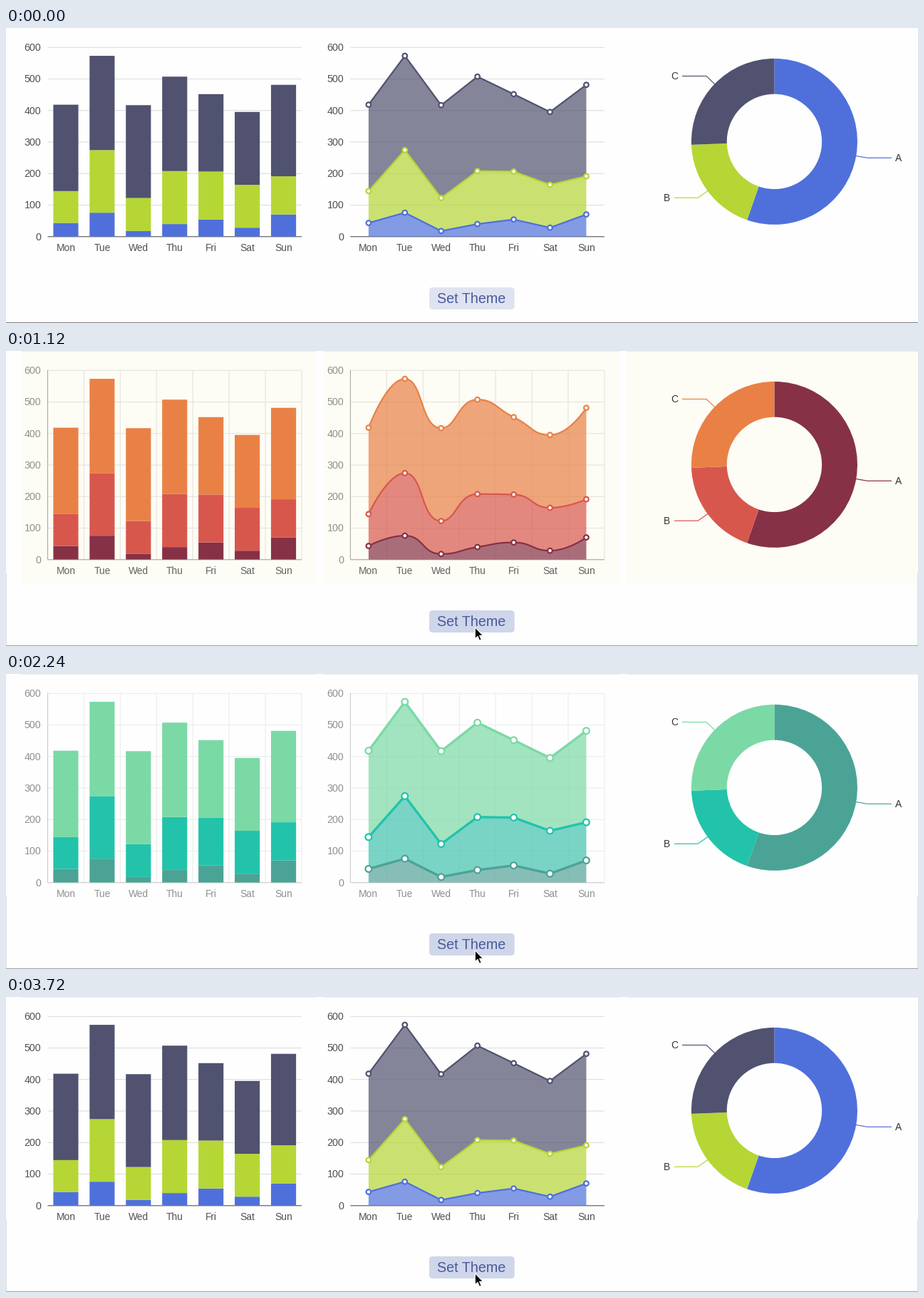
Write a matplotlib script that moves like this. It is 1280x414 px and loops after 3.88 s.

```python
import numpy as np
import matplotlib.pyplot as plt
from matplotlib.animation import FuncAnimation
from matplotlib.patches import Circle, FancyBboxPatch, Polygon, Rectangle, Wedge

W, H, DPI = 1280, 414, 64
PT = 72 / DPI
STEP, FRAMES = 40, 97
PAGE = "#fefefe"
FONT = "Liberation Sans"

DAYS = ["Mon", "Tue", "Wed", "Thu", "Fri", "Sat", "Sun"]
TOTALS = [
    [43, 75.5, 17.5, 39.5, 54, 28, 70],
    [144, 274, 122, 207.5, 206, 164, 191],
    [418, 573, 416.5, 507, 451.5, 395, 481],
]
BASE_Y, UNIT = 292.6, 0.4425
BAR_LEFT, LINE_LEFT, PLOT_W = 58.5, 483.4, 356.5
BAND = PLOT_W / 7
BAR_W = BAND * 0.69
PIE_CENTER, PIE_R, PIE_HOLE = (1078.4, 159.4), 116.5, 66.7
PIE_STOPS = [0, 199.2, 267.8, 360]
PIE_LABELS = [
    ("A", 1248, 182, "left", [(1193, 179.5), (1209, 182.3), (1243, 182.3)]),
    ("B", 932, 238, "right", [(985, 228.5), (971, 238.3), (938, 238.3)]),
    ("C", 943.5, 67.3, "right", [(995, 79), (983, 67.5), (949, 67.5)]),
]
PANELS = [(22, 435), (446, 861), (871, 1280)]

THEMES = [
    dict(colors=["#4f70db", "#b5d635", "#50526f"], panel=None, grid="#dedede",
         axis="#5f6066", y_text="#505050", x_text="#505050",
         columns=False, smooth=False, line=2.2, dot=3.3),
    dict(colors=["#863146", "#d8574d", "#e98146"], panel="#fdfcf5", grid="#e4e4de",
         axis="#a8a8a6", y_text="#909090", x_text="#626262",
         columns=True, smooth=True, line=2.2, dot=3.3),
    dict(colors=["#4ba396", "#22c3aa", "#7bd9a5"], panel=None, grid="#ececec",
         axis="#cacaca", y_text="#909090", x_text="#909090",
         areas=["#54a399", "#41c3af", "#7bd9a5"],
         columns=True, smooth=False, line=3.3, dot=4.4),
]

SWITCHES = [1120, 2000, 2960]
PRESS_MS = 160
ENTER, ARRIVE = 560, 880
CURSOR_FROM, CURSOR_TO = np.array([668, 418]), np.array([658.3, 387.8])
CURSOR = np.array([(0, 0), (0, 16), (3.7, 12.6), (6.3, 18.6), (8.9, 17.4),
                   (6.3, 11.6), (11.2, 11.4)])
NORMAL, HOVER, ACTIVE = "#dfe3f1", "#cfd6ea", "#bfc6e3"

plt.rcParams["path.snap"] = False
fig = plt.figure(figsize=(W / DPI, H / DPI), dpi=DPI, facecolor=PAGE)
ax = fig.add_axes([0, 0, 1, 1])
ax.set_xlim(0, W)
ax.set_ylim(H, 0)
ax.axis("off")


def value_y(value):
    return BASE_Y - np.asarray(value) * UNIT


def stroke(points, color, width=1.1, z=1):
    xs, ys = zip(*points)
    return ax.plot(xs, ys, color=color, lw=width * PT, zorder=z,
                   solid_capstyle="butt", solid_joinstyle="round")[0]


def fill(patch, color, z, alpha=1):
    patch.set(facecolor=color, edgecolor="none", linewidth=0, zorder=z, alpha=alpha)
    return ax.add_patch(patch)


def label(x, y, text, size, color, ha):
    return ax.text(x, y, text, fontsize=size * PT, color=color, ha=ha,
                   va="baseline", family=FONT, zorder=6)


def smooth_curve(points):
    """Bezier spline whose handles never overshoot the neighbouring points."""
    p = np.asarray(points, float)
    before, after = p.copy(), p.copy()
    for i in range(1, len(p) - 1):
        prev, here, following = p[i - 1:i + 2]
        a, b = np.linalg.norm(here - prev), np.linalg.norm(following - here)
        handle = here + (following - prev) * 0.5 * b / (a + b)
        handle = np.clip(handle, np.minimum(here, following), np.maximum(here, following))
        back = here - (handle - here) * a / b
        before[i] = np.clip(back, np.minimum(prev, here), np.maximum(prev, here))
        after[i] = here + (here - before[i]) * b / a
    t = np.linspace(0, 1, 24)[:, None]
    parts = [(1 - t) ** 3 * p[i] + 3 * (1 - t) ** 2 * t * after[i]
             + 3 * (1 - t) * t ** 2 * before[i + 1] + t ** 3 * p[i + 1]
             for i in range(len(p) - 1)]
    return np.vstack(parts)


def draw_axes(theme, left):
    right = left + PLOT_W
    parts = []
    for value in range(0, 601, 100):
        y = value_y(value)
        if value:
            parts.append(stroke([(left, y + 0.2), (right, y + 0.2)], theme["grid"]))
        parts.append(label(left - 9, y + 5, str(value), 14.3, theme["y_text"], "right"))
    if theme["columns"]:
        for i in range(1, 8):
            x = left + BAND * i
            parts.append(stroke([(x, 27), (x, BASE_Y)], theme["grid"]))
        parts.append(stroke([(left, 26.5), (left, BASE_Y)], theme["axis"], 1.1, 1.2))
    parts.append(stroke([(left, BASE_Y + 0.2), (right, BASE_Y + 0.2)], theme["axis"], 1.2, 1.2))
    for i, day in enumerate(DAYS):
        parts.append(label(left + BAND * (i + 0.5), 313, day, 13.7, theme["x_text"], "center"))
    return parts


def draw_bars(theme):
    parts = []
    lower = np.zeros(7)
    for totals, color in zip(TOTALS, theme["colors"]):
        for i in range(7):
            y0, y1 = value_y(lower[i]), value_y(totals[i])
            x = BAR_LEFT + BAND * (i + 0.5) - BAR_W / 2
            parts.append(fill(Rectangle((x, y1), BAR_W, y0 - y1), color, 1.5))
        lower = totals
    return parts


def draw_lines(theme):
    parts = []
    xs = LINE_LEFT + BAND * (np.arange(7) + 0.5)
    below = np.array([(xs[0], BASE_Y), (xs[-1], BASE_Y)])
    areas = theme.get("areas", theme["colors"])
    for totals, color, tint in zip(TOTALS, theme["colors"], areas):
        points = np.column_stack([xs, value_y(totals)])
        curve = smooth_curve(points) if theme["smooth"] else points
        area = Polygon(np.vstack([curve, below[::-1]]))
        parts.append(fill(area, tint, 1.5, 0.7))
        parts.append(stroke(curve, color, theme["line"], 3))
        # patches keep sub-pixel centres, plot markers do not
        parts += [ax.add_patch(Circle(point, theme["dot"], facecolor="white", edgecolor=color,
                                      linewidth=2.2 * PT, zorder=4)) for point in points]
        below = curve
    return parts


def draw_pie(theme):
    parts = []
    for i, color in enumerate(theme["colors"]):
        # the y axis points down, so angles grow clockwise
        slice_ = Wedge(PIE_CENTER, PIE_R, PIE_STOPS[i] - 90, PIE_STOPS[i + 1] - 90,
                       width=PIE_R - PIE_HOLE)
        text, x, y, ha, leader = PIE_LABELS[i]
        parts += [fill(slice_, color, 2), stroke(leader, color, 1.2, 1),
                  label(x, y + 5, text, 13.8, "#303030", ha)]
    return parts


def draw_theme(theme):
    parts = []
    if theme["panel"]:
        parts += [fill(Rectangle((x0, 0), x1 - x0, 325), theme["panel"], 0)
                  for x0, x1 in PANELS]
    parts += draw_axes(theme, BAR_LEFT) + draw_axes(theme, LINE_LEFT)
    return parts + draw_bars(theme) + draw_lines(theme) + draw_pie(theme)


layers = [draw_theme(theme) for theme in THEMES]
top_edges = [stroke([(x0, 0.5), (x1, 0.5)], "#ececea", 1) for x0, x1 in PANELS]
side_edges = [stroke([(x, 312), (x, H)], "#dedede", 1) for x in (0.5, W - 0.5)]
bottom_edge = stroke([(0, H - 0.5), (W, H - 0.5)], "#808080", 1)

button = FancyBboxPatch((599, 369), 109.7, 21, boxstyle="round,pad=5,rounding_size=5")
fill(button, NORMAL, 5)
label(653.5, 386, "Set Theme", 19.8, "#4a599a", "center")
pointer = Polygon(CURSOR, facecolor="black", edgecolor="white", lw=1.1 * PT,
                  joinstyle="round", zorder=8)
ax.add_patch(pointer)


def update(frame):
    now = frame * STEP
    switched = sum(now >= s for s in SWITCHES)
    for i, layer in enumerate(layers):
        for artist in layer:
            artist.set_visible(i == switched % len(layers))
    for edge in top_edges:
        edge.set_visible(switched > 0)
    for edge in side_edges:
        edge.set_visible(now >= ENTER)
    bottom_edge.set_color("#808080" if now < ENTER else "#a0a0a0")

    progress = np.clip((now - ENTER) / (ARRIVE - ENTER), 0, 1)
    tip = CURSOR_FROM + (CURSOR_TO - CURSOR_FROM) * (1 - (1 - progress) ** 2)
    pointer.set_xy(CURSOR + tip)
    pointer.set_visible(now >= ENTER)

    pressed = any(s - PRESS_MS <= now < s for s in SWITCHES)
    over = now >= ENTER and tip[1] < 395
    button.set_facecolor(ACTIVE if pressed else HOVER if over else NORMAL)
    return []


anim = FuncAnimation(fig, update, frames=FRAMES, interval=STEP, repeat=True,
                     repeat_delay=0, init_func=lambda: update(0), blit=False)
plt.show()
```
